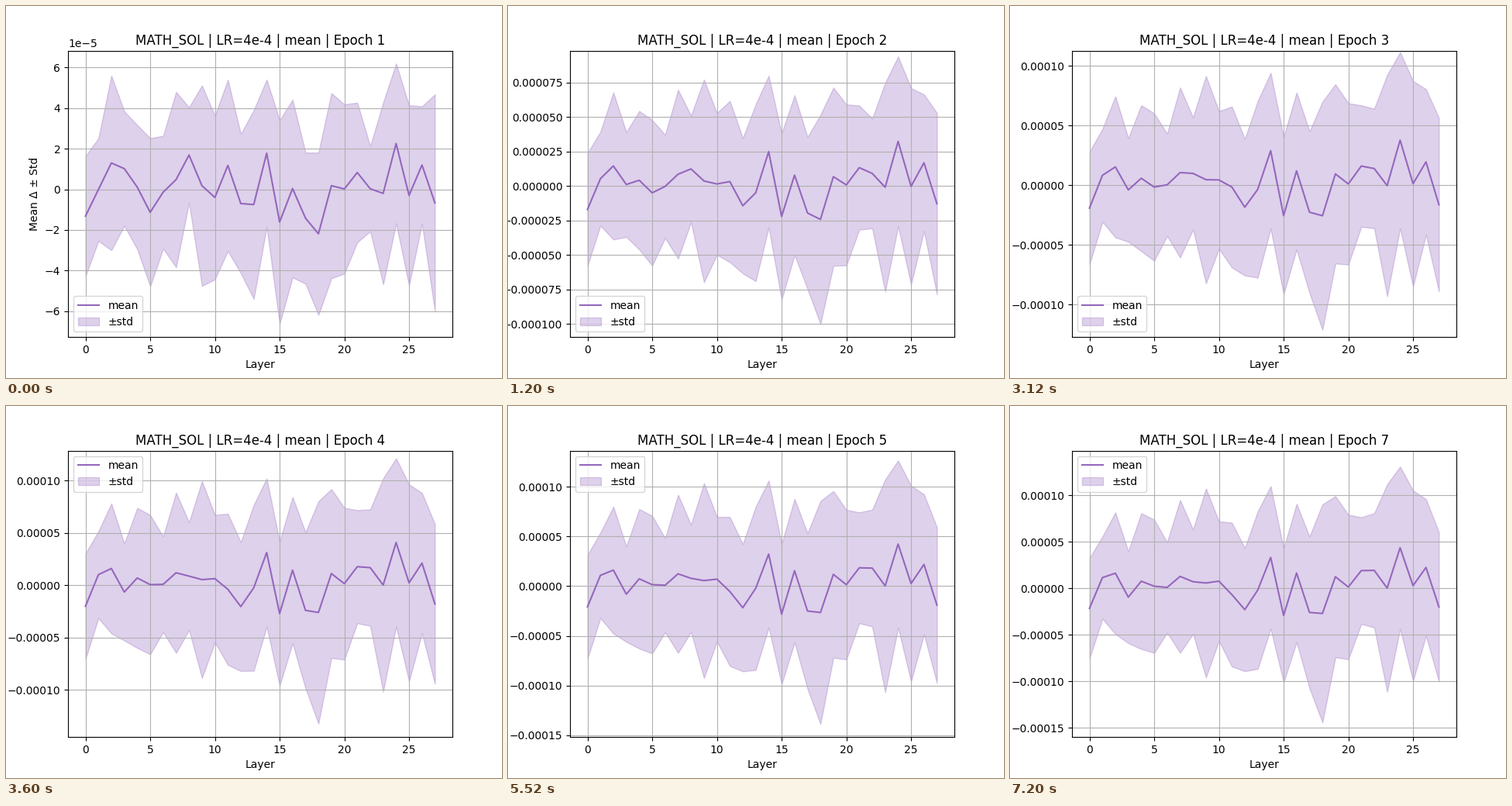
Write a matplotlib script that moves like this. It is 640x480 px and loops after 8000 ms.

```python
import numpy as np
import matplotlib.pyplot as plt
from matplotlib.animation import FuncAnimation

UNIT = 1e-7  # all values below are in this unit
STEP_MS = 400
FRAMES = 20
FRAMES_PER_EPOCH = 3
RATE = 0.6  # how fast the layers settle per epoch
PURPLE = "tab:purple"

# Per-layer values at the first epoch and where training settles.
MEAN_START = np.array([
    -132, -1, 130, 102, 11, -113, -14, 48, 169, 18, -40, 118, -70, -75,
    178, -161, 4, -142, -219, 18, 2, 83, 3, -20, 226, -30, 120, -67])
MEAN_END = np.array([
    -216, 120, 165, -99, 80, 28, 12, 132, 70, 60, 82, -71, -232, -16,
    338, -294, 171, -261, -270, 129, 16, 195, 200, 5, 444, 32, 229, -203])
STD_START = np.array([
    296, 253, 430, 282, 306, 365, 278, 432, 235, 494, 403, 422, 343, 465,
    363, 502, 438, 323, 400, 456, 417, 344, 210, 448, 394, 444, 289, 535])
STD_END = np.array([
    546, 448, 660, 500, 742, 726, 493, 833, 571, 1030, 650, 783, 671, 858,
    778, 727, 752, 830, 1195, 878, 787, 580, 626, 1134, 886, 1040, 747, 810])

# Value range that each epoch's axis covers, before the 5% margin.
RANGES = [(-663.7, 619.3), (-1001.7, 888.3), (-1162, 1019), (-1329, 1162),
          (-1389, 1234), (-1460, 1323), (-1458, 1342)]

fig, ax = plt.subplots(figsize=(6.4, 4.8), dpi=100)


def settle(start, end, step):
    """Approach the end values exponentially."""
    return UNIT * (end + (start - end) * np.exp(-RATE * step))


def draw(frame):
    step = frame // FRAMES_PER_EPOCH
    mean = settle(MEAN_START, MEAN_END, step)
    std = settle(STD_START, STD_END, step)
    layers = np.arange(len(mean))
    low, high = RANGES[step]
    margin = 0.05 * (high - low)

    ax.clear()
    ax.plot(layers, mean, color=PURPLE, label="mean")
    ax.fill_between(layers, mean - std, mean + std,
                    color=PURPLE, alpha=0.3, label="±std")
    ax.set_ylim((low - margin) * UNIT, (high + margin) * UNIT)
    ax.set_title(f"MATH_SOL | LR=4e-4 | mean | Epoch {step + 1}")
    ax.set_xlabel("Layer")
    ax.set_ylabel("Mean Δ ± Std")
    ax.grid(True)
    # The legend moves up once the band leaves room in the top corner.
    ax.legend(loc="lower left" if step < 3 else "upper left")


anim = FuncAnimation(fig, draw, frames=FRAMES, interval=STEP_MS,
                     init_func=lambda: draw(0), repeat=True, repeat_delay=0)
plt.show()
```
